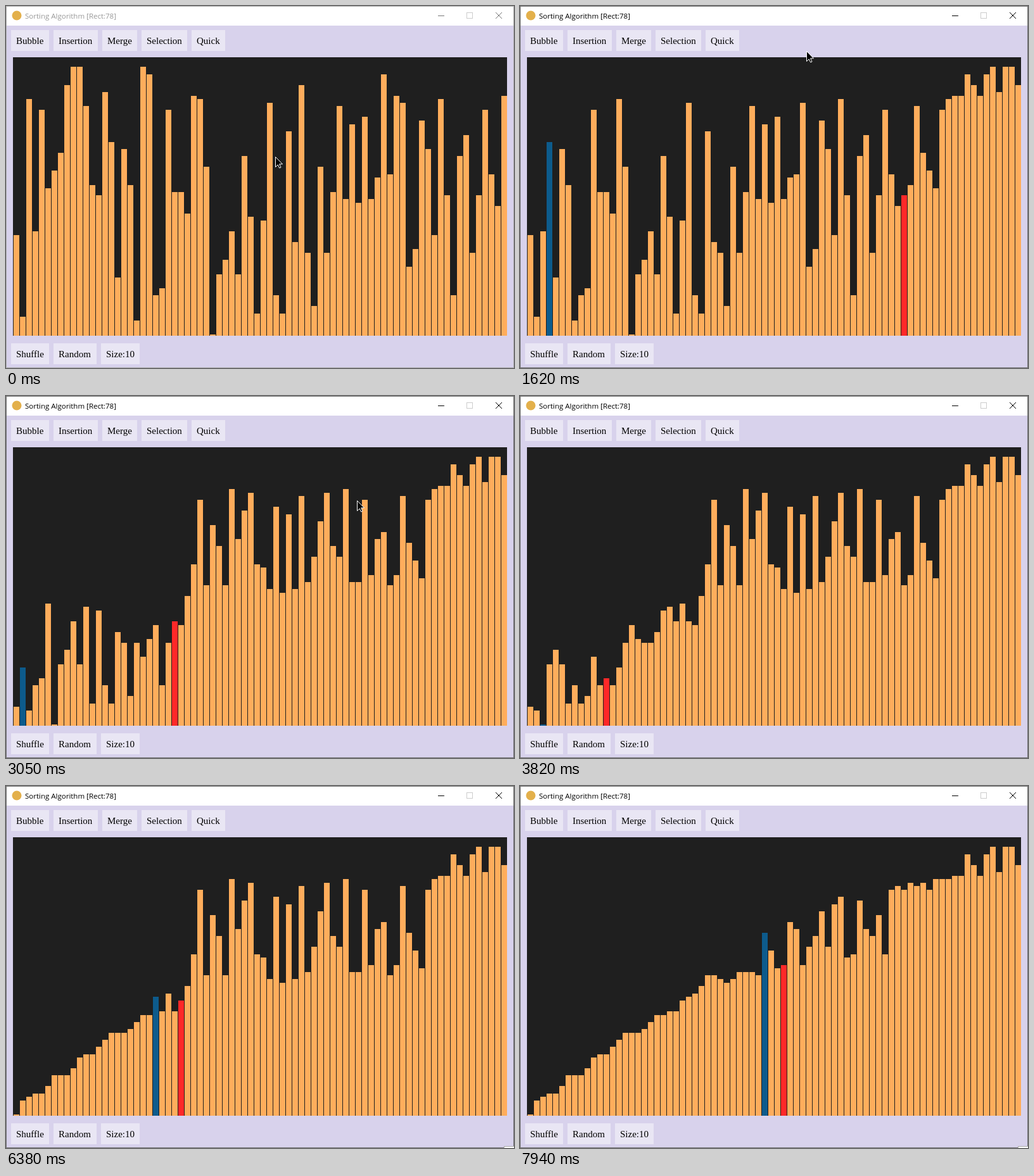
Recreate the animation shown at these times as an HTML page. Size 802x572 px, loop 8000 ms.

```html
<!DOCTYPE html>
<html lang="en">
<head>
<meta charset="utf-8">
<title>Sorting Algorithm</title>
<style>
  html, body { margin: 0; width: 100%; height: 100%; overflow: hidden; }
  svg { display: block; width: 802px; height: 572px; }
  .title { font: 11.5px "Open Sans", sans-serif; }
  .label { font: 15px "Liberation Serif", serif; }
</style>
</head>
<body>
<svg id="stage" viewBox="0 0 802 572" shape-rendering="crispEdges"></svg>
<script>
const LOOP = 8000, REFRESH = 67.9, LEAD = 10, ACTIVATE = 550, CORNER = 5170;
const ORANGE = '#ffad5c', BLUE = '#0d5b8c', RED = '#ff2828';
const PLOT = { x: 11, y: 81, width: 780, height: 440 };

// The numbers to sort; bar height and place follow from them.
const levels = [
  28, 5, 66, 29, 63, 41, 46, 51, 70, 75, 75, 64, 42, 39, 68, 54, 16, 52, 42, 4,
  75, 73, 11, 13, 63, 40, 40, 34, 67, 66, 47, 0, 17, 21, 29, 17, 50, 33, 6, 32,
  65, 11, 6, 57, 26, 70, 23, 8, 47, 23, 40, 64, 38, 59, 37, 61, 38, 44, 73, 45,
  67, 65, 19, 24, 60, 52, 28, 66, 39, 11, 50, 56, 23, 39, 63, 45, 36, 67
];
const count = levels.length;
const barHeight = level => Math.floor(2 + level * PLOT.height / count);

// [time, sorting step]: one even run, held up while the pointer leaves
const pace = [[0, 0], [900, 1], [1000, 4], [1620, 20], [3050, 54], [3310, 55], [7940, 168]];

// [time, x, y] of the pointer
const track = [
  [0, 425, 238], [600, 314, 48], [790, 314, 48], [1010, 452, 71],
  [2900, 452, 71], [3040, 554, 165], [3190, 554, 165], [3350, 803, 350]
];

// Quicksort: bars not below the pivot are taken out and put right after it.
// Every call spends one step, and so does every move.
function sortSteps(start) {
  const a = start.slice();
  let last = { levels: start, blue: -1, red: -1 };
  const steps = [last];
  (function sort(lo, hi) {
    steps.push(last);
    if (lo >= hi) return;
    const pivot = a[hi];
    let i = lo, p = hi;
    while (i < p) {
      if (a[i] < pivot) { i++; continue; }
      a.splice(p, 0, a.splice(i, 1)[0]);
      last = { levels: a.slice(), blue: i, red: p-- };
      steps.push(last);
    }
    sort(lo, p - 1);
    sort(p + 1, hi);
  })(0, count - 1);
  return steps;
}

const stage = document.getElementById('stage');
function set(el, attrs) {
  for (const k in attrs) el.setAttribute(k, attrs[k]);
}
function add(tag, attrs, text) {
  const el = document.createElementNS('http://www.w3.org/2000/svg', tag);
  set(el, attrs);
  if (text) el.textContent = text;
  return stage.appendChild(el);
}
const rect = (x, y, width, height, fill) => add('rect', { x, y, width, height, fill });
const line = (d, extra) => add('path', { d, fill: 'none', 'stroke-width': 1, ...extra });
function button(x, y, width, name) {
  rect(x, y, width, 33, '#e9e6f4');
  add('text', { x: x + 8, y: y + 22, class: 'label' }, name);
}

rect(0, 0, 802, 572, '#d8d2ec');
rect(0, 0, 802, 31, '#fff');
add('circle', { cx: 17, cy: 15, r: 7.5, fill: '#e3b04b', 'shape-rendering': 'auto' });
const title = add('text', { x: 30, y: 20, class: 'title' }, 'Sorting Algorithm [Rect:78]');
const minimise = line('M682 15.5H692');
line('M727.5 10.5H736.5V19.5H727.5Z', { stroke: '#ccc' });
const close = line('M773 10L783 20M783 10L773 20', { 'shape-rendering': 'auto' });

button(8, 38, 60, 'Bubble');
button(75, 38, 70, 'Insertion');
button(152, 38, 55, 'Merge');
button(214, 38, 72, 'Selection');
button(293, 38, 53, 'Quick');
button(8, 533, 60, 'Shuffle');
button(75, 533, 68, 'Random');
button(150, 533, 61, 'Size:10');

add('rect', { ...PLOT, fill: '#1f1f1f' });
const bars = levels.map((_, i) => rect(PLOT.x + 1 + 10 * i, 0, 9, 0, ORANGE));
const border = line('M.5 .5H801.5V571.5H.5Z');
const corner = add('path', { d: 'M786.5 573V569.5H803V573Z', fill: '#fff', stroke: '#aaa' });
const pointer = add('path', {
  d: 'M.5 .5V16.5L4.2 12.9L6.7 18L9 17L6.6 11.8H11.5Z',
  fill: '#000', stroke: '#fff', 'stroke-linejoin': 'round', 'shape-rendering': 'auto'
});

// Values of a keyed list at time t, linear between keys.
function at(keys, t) {
  const n = keys.findIndex(k => k[0] > t);
  if (n < 0) return keys[keys.length - 1].slice(1);
  const a = keys[n - 1], b = keys[n];
  const k = (t - a[0]) / (b[0] - a[0]);
  return a.slice(1).map((v, i) => v + (b[i + 1] - v) * k);
}

const steps = sortSteps(levels);

function draw(time) {
  const t = Math.floor((time + LEAD) / REFRESH) * REFRESH;
  const step = steps[Math.floor(at(pace, t)[0])];
  bars.forEach((bar, i) => {
    const height = barHeight(step.levels[i]);
    const fill = i === step.red ? RED : i === step.blue ? BLUE : ORANGE;
    set(bar, { y: PLOT.y + PLOT.height - height, height, fill });
  });

  const active = t >= ACTIVATE;
  set(title, { fill: active ? '#000' : '#999' });
  set(minimise, { stroke: active ? '#000' : '#777' });
  set(close, { stroke: active ? '#000' : '#777' });
  set(border, { stroke: active ? '#707070' : '#aaa' });
  set(corner, { visibility: t >= CORNER ? 'visible' : 'hidden' });

  const [x, y] = at(track, t).map(Math.round);
  set(pointer, { transform: `translate(${x} ${y})` });
}

const begin = performance.now();
function tick() {
  draw((performance.now() - begin) % LOOP);
  requestAnimationFrame(tick);
}
draw(0);
requestAnimationFrame(tick);
</script>
</body>
</html>
```
